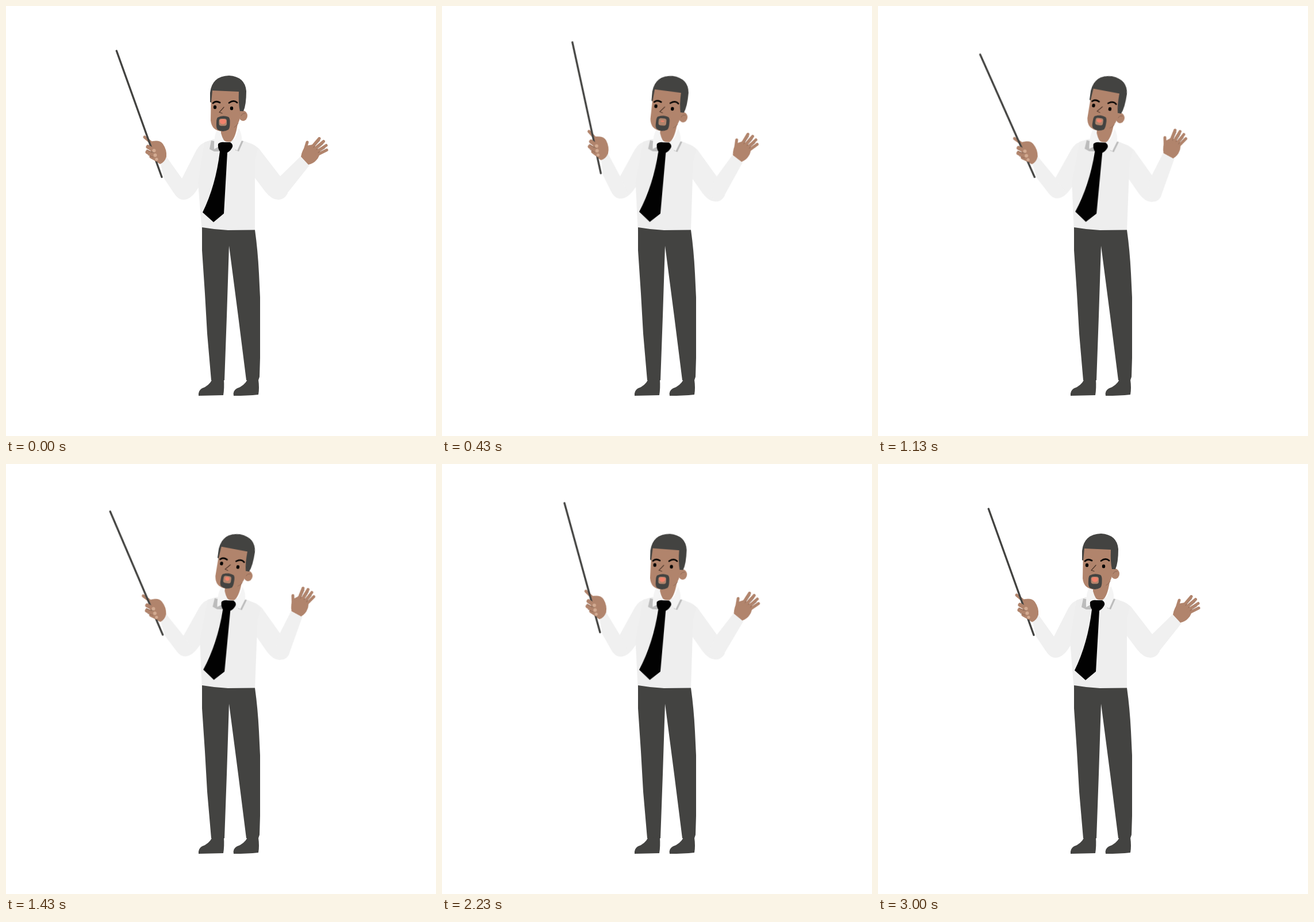
Write an HTML page without scripts that moves like this. It is 748 px wide and 748 px high and loops after 3.03 s.

```html
<!DOCTYPE html>
<html lang="en">
<head>
<meta charset="utf-8">
<title>Teacher with a pointer</title>
<style>
html, body { margin: 0; width: 100%; height: 100%; overflow: hidden; background: #fff; }
svg { display: block; width: 100vw; height: 100vh; }

.dark { fill: #434341; }
.skin { fill: #b1846c; }
.body { fill: #eee; }
.sleeve { fill: #f0f0f0; }
.line { fill: none; stroke-linecap: round; stroke-linejoin: round; }
.finger { stroke: #b1846c; stroke-width: 5; }
.crease { stroke: #8a6451; stroke-width: .9; }

.torso, .head, .pointer, .wave, .mouth { animation: 3.03s linear infinite; }
.torso { transform-origin: 375px 390px; animation-name: sway; }
.head { transform-origin: 391px 205px; animation-name: nod; }
.pointer { transform-origin: 306px 318px; animation-name: point; }
.wave { transform-origin: 474px 315px; animation-name: wave; }
.mouth { transform-origin: 377px 201px; animation-name: talk; animation-timing-function: ease-in-out; }

@keyframes sway {
  0% { transform: rotate(0deg); animation-timing-function: ease-in-out; }
  19.8%, 62.7% { transform: rotate(2.2deg); animation-timing-function: ease-in-out; }
  99%, 100% { transform: rotate(0deg); }
}
@keyframes nod {
  0% { transform: rotate(0deg); animation-timing-function: ease-in-out; }
  27.4%, 58% { transform: rotate(6deg); animation-timing-function: ease-in-out; }
  75%, 100% { transform: rotate(0deg); }
}
@keyframes point {
  0% { transform: rotate(0deg); animation-timing-function: cubic-bezier(.42, 0, .7, .85); }
  17.5% { transform: rotate(6.8deg); animation-timing-function: cubic-bezier(.4, .15, .7, .7); }
  27.4% { transform: rotate(.2deg); }
  35.3% { transform: rotate(-4.9deg); animation-timing-function: cubic-bezier(.3, .3, .7, .9); }
  42.2% { transform: rotate(-9.5deg); animation-timing-function: cubic-bezier(.3, .1, .7, .7); }
  47.2% { transform: rotate(-5.6deg); }
  52.8% { transform: rotate(-.4deg); }
  60.4% { transform: rotate(6.8deg); animation-timing-function: ease-out; }
  63% { transform: rotate(7.3deg); animation-timing-function: ease-in; }
  70.3% { transform: rotate(4.7deg); }
  73.6% { transform: rotate(2.55deg); animation-timing-function: cubic-bezier(.2, .4, .6, 1); }
  88.1% { transform: rotate(.14deg); }
  99%, 100% { transform: rotate(0deg); }
}
@keyframes wave {
  0% { transform: rotate(0deg); animation-timing-function: ease-in-out; }
  27%, 53.8% { transform: rotate(-21deg); }
  60.4% { transform: rotate(-16.2deg); }
  73.6% { transform: rotate(-9.7deg); }
  88.1% { transform: rotate(-1.5deg); animation-timing-function: ease-out; }
  99%, 100% { transform: rotate(0deg); }
}
@keyframes talk {
  0%, 7%, 21%, 34%, 54%, 72%, 86%, 100% { transform: scale(1); }
  14.2%, 41%, 66%, 79%, 93% { transform: scale(.6, .3); }
  27.4%, 47.2%, 60.4% { transform: scale(.7, .75); }
}
</style>
</head>
<body>
<svg viewBox="0 0 748 748">
  <g class="torso">
    <path class="sleeve" d="M352 235Q338 238 331 251L306 300L291 322Q298 337 309 337Q322 337 334 317L350 300Z"/>
    <path class="sleeve" d="M408 234Q430 238 440 248L477 296L490 326Q484 337 474 337Q462 337 451 323L433 299L415 270Z"/>
    <path class="body" d="M360 232L345 237L334 308L341 394H433V270L438 247Q425 238 408 233Z"/>

    <g class="pointer">
      <path class="sleeve" d="M279 262L269 275L275 300L291 324Q299 337 309 337L323 328L306 300Z"/>
      <path class="skin" d="M249 237Q266 231 273 240Q280 250 279 262Q276 272 268 275Q258 270 253 260Z"/>
      <path class="line finger" d="M241 228L254 239"/>
      <path class="line" stroke="#434341" stroke-width="3.400" d="M192.300 78L271 297.500"/>
      <g class="line" stroke="#b1846c" stroke-width="7">
        <path d="M247 245L257 251M246 254L259 260M253 262L262 267"/>
      </g>
      <g fill="#d3ab92">
        <circle cx="257.500" cy="251.500" r="3"/>
        <circle cx="259.500" cy="259.500" r="3"/>
        <circle cx="262" cy="266.500" r="2.600"/>
      </g>
      <path class="line crease" d="M245 250L254 255M247 259L256 263"/>
    </g>

    <g class="wave">
      <path class="sleeve" d="M512 262L528 277L489 326Q482 337 473 337L460 323L477 296Z"/>
      <path class="skin" d="M513 262Q515 250 522 243L534 241L546 252Q546 262 540 268Q535 274 526 276Z"/>
      <path class="line finger" d="M520 250L524 237M530 248L545 230.500M535 250L552.500 235.500M539 254L557 242.500M541 259L558 250.500"/>
      <path class="line crease" d="M535 246L546 234M540 250L552 239.500M543 255L555 247"/>
    </g>

    <path fill="#bcbcbc" d="M357 234L354 249L362 253L380 253L366 236ZM407 234L413 235L405 253L399 251Z"/>
    <path class="skin" d="M374 208V229Q381 238 391 236Q399 231 403 205Z"/>
    <path fill="#f4f4f4" d="M369 212Q361 224 362 249L382 238Q375 229 373 216ZM405 212Q411 224 410 234L402 252L390 239Q400 232 403 218Z"/>
    <path fill="#020202" d="M369 240Q373 236 380 237H390Q395 240 394 245Q391 252 385 255L379 361L361 376L342 359Q365 312 372 253Q368 247 369 240Z"/>

    <g class="head">
      <path class="skin" d="M357 145L356 199Q358 218 377 218Q389 218 398 211Q408 203 409 180L407 145Z"/>
      <ellipse class="skin" cx="412.500" cy="191" rx="7.500" ry="9"/>
      <path class="line crease" d="M409 191Q411 186 416 187M397 211Q402 208 404 204"/>
      <path class="dark" d="M355 167V151Q358 122 388 121Q416 123 418 148Q418 172 413 183H407Q404 170 405 149L359 147L357 168Z"/>
      <path class="line" stroke="#090706" stroke-width="2.800" d="M360 169Q365 164 372 168M388 168.500Q396 162.500 402 168"/>
      <ellipse cx="363.500" cy="176" rx="2.700" ry="3.200"/>
      <ellipse cx="392.500" cy="178" rx="2.700" ry="3.200"/>
      <path class="line" stroke="#4d362b" stroke-width="1.200" d="M379 176L371 185L376 186.500"/>
      <path class="dark" d="M368 194Q377 189 387 193Q390 195 389.500 204Q389.500 212 387 215Q377 221 368 215Q365.500 212 366 204Q366 196 368 194Z"/>
      <rect class="skin" x="370.500" y="196" width="13.500" height="12.500" rx="4"/>
      <path class="mouth" fill="#f0826c" d="M371.500 198.500Q377 195 383 198.500Q383 205.500 377 205.500Q371.500 205 371.500 198.500Z"/>
    </g>
  </g>

  <path class="dark" d="M341 385Q364 389 386 390L433 389.500Q438 425 440 465L442 507V612L441 645L439 651H418L404 540L388 417L384 540L380 651H357L350 570L346 500L341 425Z"/>
  <path class="dark" d="M359 649L379 650Q380 665 378 677L335 678Q334 669 341 665Q353 661 359 649ZM420 650H439Q441 665 439 676Q420 678 396 678Q394 669 402 665Q414 661 420 650Z"/>
</svg>
</body>
</html>
```
